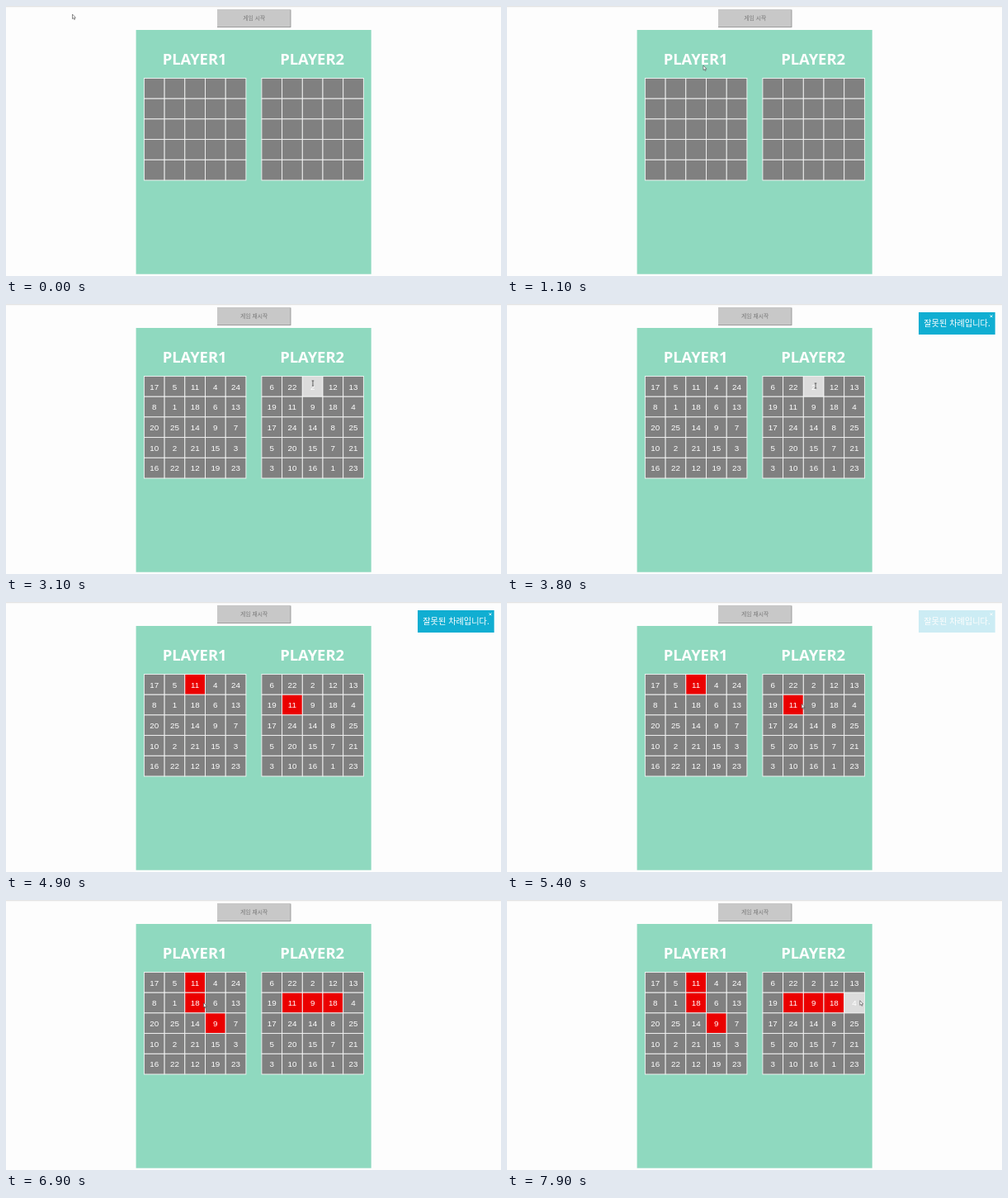
Write an HTML page that moves like this. It is 600 px wide and 327 px high and loops after 8 s.

```html
<!DOCTYPE html>
<html lang="ko">
<head>
<meta charset="utf-8">
<title>Bingo</title>
<style>
html, body { margin: 0; width: 100%; height: 100%; overflow: hidden; background: #fdfdfd; }
svg { display: block; }
text { fill: #fff; text-anchor: middle; }
.title { font: bold 18.4px "Open Sans", "Noto Sans", sans-serif; }
.number { font: 9.8px "Liberation Sans", Arial, sans-serif; }
.korean { font-family: "Noto Sans CJK KR", "Noto Sans CJK", sans-serif; }
#label { fill: #777; }
</style>
</head>
<body>
<svg id="stage" width="600" height="327" viewBox="0 0 600 327">
  <rect width="600" height="1.3" fill="#e3e3e3"/>
  <rect x="157.6" y="29" width="285.1" height="295.7" fill="#8fd9bf"/>
  <rect x="256" y="4.5" width="89.4" height="21.4" fill="#8c8c8c"/>
  <rect id="face" x="256" y="4.5" width="88.6" height="20.6" fill="#c8c8c8" stroke-width=".8"/>
  <text id="label" class="korean" x="300.7" y="17.3" font-size="6.8"></text>
  <g id="boards"></g>
  <g id="toast">
    <rect x="499" y="10" width="92.7" height="27" fill="#10aed2"/>
    <text class="korean" x="545.5" y="27.2" font-size="10.2">잘못된 차례입니다.</text>
    <path d="M585.6 13.4l2.8 2.8m0-2.8l-2.8 2.8" stroke="#fff" stroke-width=".9"/>
  </g>
  <g id="cursor">
    <path id="arrow" d="M0 0V5.6L1.3 4.5L2.2 6.5L3.1 6.1L2.3 4.2H3.9Z" fill="#fff" stroke="#444" stroke-width=".6"/>
    <path id="beam" d="M-1.3-3H1.3M0-3V3M-1.3 3H1.3" fill="none" stroke="#444" stroke-width=".8"/>
  </g>
</svg>
<script>
const $ = id => document.getElementById(id);
const DURATION = 8000, STEP = 100, START = 2000;
const PITCH = 24.7, TOP = 87.5;
const boards = [
  { left: 167.4, numbers: "17 5 11 4 24 8 1 18 6 13 20 25 14 9 7 10 2 21 15 3 16 22 12 19 23" },
  { left: 309.9, numbers: "6 22 2 12 13 19 11 9 18 4 17 24 14 8 25 5 20 15 7 21 3 10 16 1 23" }
];
const pickTimes = { 11: 4600, 9: 5700, 18: 6700 };

// Pointer moves: start time, end time, destination
const home = [80.5, 10];
const moves = [
  [400, 700, 428, 86], [800, 1100, 238, 72], [1100, 1300, 345, 23], [1400, 1600, 314, 10.5],
  [2300, 3200, 374, 99], [3800, 4300, 204, 80], [4300, 4500, 229, 100],
  [5000, 5500, 372, 126], [5700, 6100, 309, 128], [6100, 6500, 231, 124],
  [6700, 6900, 239.5, 124.5], [6900, 7100, 452, 62], [7100, 7400, 234, 104], [7400, 7900, 427.8, 121.8]
];

const clamp = v => Math.max(0, Math.min(1, v));
const progress = (t, from, to) => clamp((t - from) / (to - from));
const ease = k => k * k * (3 - 2 * k);
const show = (node, visible) => node.style.display = visible ? "" : "none";

function add(tag, attrs, text = "") {
  const node = document.createElementNS("http://www.w3.org/2000/svg", tag);
  for (const name in attrs) node.setAttribute(name, attrs[name]);
  node.textContent = text;
  return $("boards").appendChild(node);
}

const cells = boards.flatMap(({ left, numbers }, player) => {
  add("text", { class: "title", x: left + 61.2, y: 70.7 }, "PLAYER" + (player + 1));
  return numbers.split(" ").map((number, i) => {
    const x = left + i % 5 * PITCH, y = TOP + Math.floor(i / 5) * PITCH;
    const rect = add("rect", { x, y, width: PITCH, height: PITCH, stroke: "#f4f4f4", "stroke-width": .9 });
    const text = add("text", { class: "number", x: x + PITCH / 2, y: y + 16.1 }, number);
    return { number, x, y, rect, text };
  });
});

function pointerAt(t) {
  return moves.reduce(([x, y], [from, to, endX, endY]) => {
    const k = ease(progress(t, from, to));
    return [x + (endX - x) * k, y + (endY - y) * k];
  }, home);
}

function draw(t) {
  const [px, py] = pointerAt(t);
  const started = t >= START;
  let overText = false, overPicked = false;
  for (const { number, x, y, rect, text } of cells) {
    // hover reaches slightly past the left border
    const hover = px >= x - 1.5 && px < x + PITCH - 1.5 && py >= y && py < y + PITCH;
    const picked = t >= pickTimes[number];
    rect.setAttribute("fill", picked ? "#eb0000" : hover ? "#dcdcdc" : "#808080");
    show(text, started);
    if (hover && started && Math.abs(px - x - PITCH / 2) < 6) {
      overText = true;
      overPicked = picked;
    }
  }
  const focus = t >= 1800 && t < 2400;
  $("face").setAttribute("stroke", focus ? "#96bfca" : "none");
  $("label").textContent = started ? "게임 재시작" : "게임 시작";
  $("toast").setAttribute("opacity", progress(t, 3200, 3500) * (1 - progress(t, 5000, 5500)));
  show($("arrow"), !overText);
  show($("beam"), overText && !overPicked);
  $("cursor").setAttribute("transform", `translate(${px} ${py})`);
}

function tick() {
  draw(Math.floor(performance.now() % DURATION / STEP) * STEP);
  requestAnimationFrame(tick);
}
tick();
</script>
</body>
</html>
```
